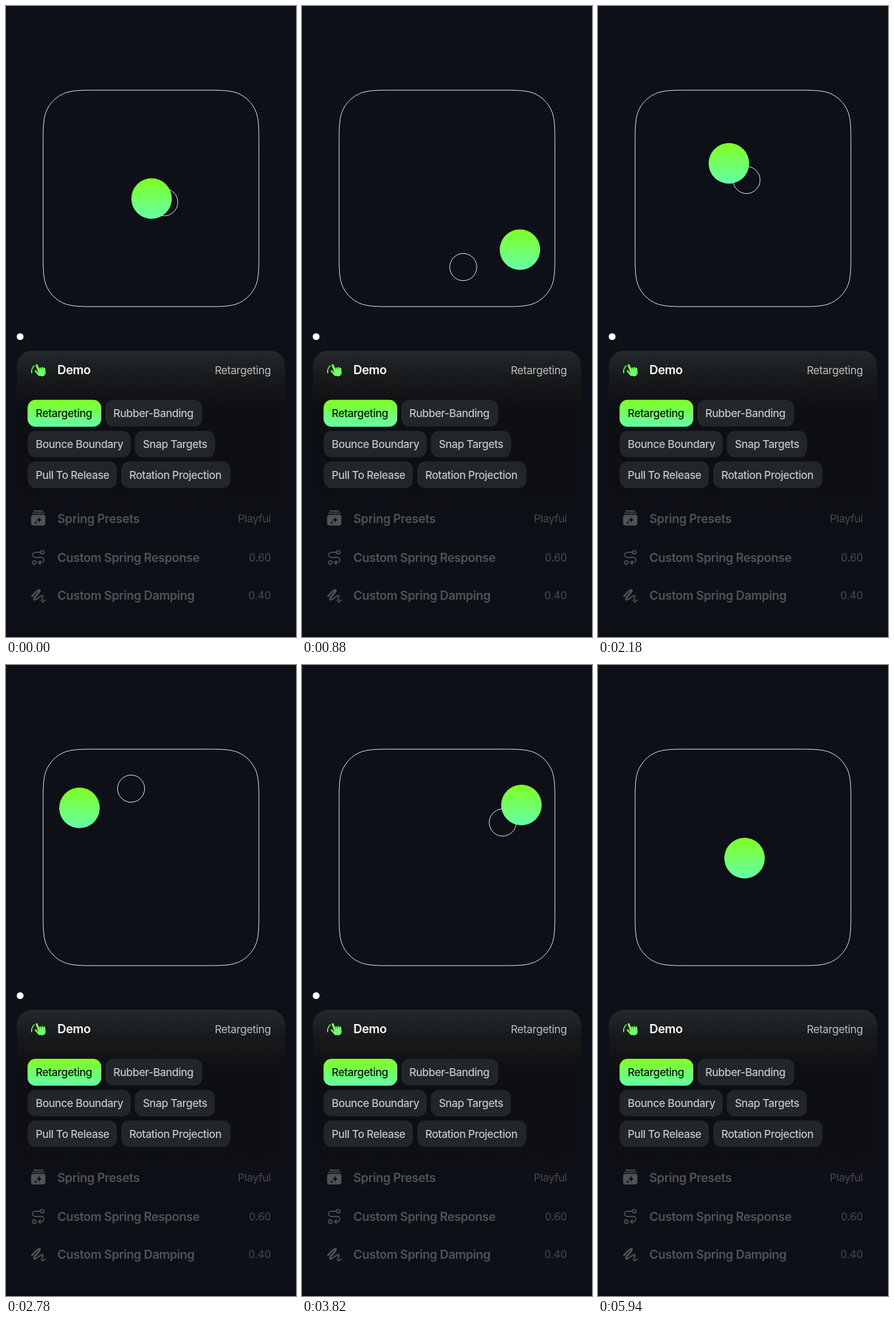
An HTML page that plays this animation: 508x1102 px, repeating every 6.01 s.

```html
<!DOCTYPE html>
<html lang="en">
<head>
<meta charset="utf-8">
<title>Retargeting demo</title>
<style>
  html, body { margin: 0; width: 100%; height: 100%; overflow: hidden; background: #0d1017; }
  svg { display: block; width: 100%; height: 100%; }
  text { font-family: Inter, "Liberation Sans", sans-serif; }
  .chip rect { fill: #222629; }
  .chip text { font-size: 18.8px; font-weight: 500; letter-spacing: -.024em; fill: #c3c5c8; }
  .chip.on rect { fill: url(#lime); }
  .chip.on text { fill: #0a160c; }
  .name { font-size: 21.2px; font-weight: 600; letter-spacing: -.02em; fill: #505356; }
  .value { font-size: 18.8px; letter-spacing: -.018em; text-anchor: end; fill: #47494d; }
  .head .name { fill: #fff; }
  .head .value { fill: #bcbec0; }
  .line { fill: none; stroke: #fff; }
  .icon { fill: none; stroke: #505356; stroke-linecap: round; stroke-linejoin: round; }
</style>
</head>
<body>
<svg viewBox="0 0 508 1102" preserveAspectRatio="none">
  <defs>
    <linearGradient id="lime" x2="0" y2="1">
      <stop stop-color="#80ff20"/>
      <stop offset="1" stop-color="#65ffaa"/>
    </linearGradient>
    <linearGradient id="panel" x2="0" y2="1">
      <stop stop-color="#24292b"/>
      <stop offset=".11" stop-color="#17191b"/>
      <stop offset=".23" stop-color="#0d0f12"/>
      <stop offset=".5" stop-color="#0d0f15"/>
      <stop offset="1" stop-color="#0d1017"/>
    </linearGradient>
    <path id="corner" d="M0-189H94.3C121.5-189 135.2-189 149.9-184.4C165.9-178.5 178.5-165.9 184.4-149.9C189-135.2 189-121.5 189-94.3V0"/>
  </defs>
  <rect width="508" height="1102" fill="#0d1017"/>
  <rect y="1098" width="508" height="4" fill="#0b0d11"/>

  <g class="line" transform="translate(254 336)">
    <use href="#corner"/>
    <use href="#corner" transform="rotate(90)"/>
    <use href="#corner" transform="rotate(180)"/>
    <use href="#corner" transform="rotate(270)"/>
  </g>

  <path d="M19 1050V628a26 26 0 0 1 26-26H463a26 26 0 0 1 26 26V1050Z" fill="url(#panel)"/>

  <g class="head">
    <g class="icon" style="stroke:#78ff55">
      <path d="M44.9 640.5C44.5 634.5 46.8 630.5 49.6 628.4" stroke-width="1.8"/>
      <path d="M53.8 627.4L59 641" stroke-width="3.8"/>
      <path d="M51.8 637.6L58.5 645M59.8 632.6L61.6 639M63.6 632L64.8 639M67.2 633L67.8 640" stroke-width="3"/>
      <ellipse cx="63" cy="640.8" rx="6.4" ry="6" fill="#70ff76" stroke="none"/>
    </g>
    <text class="name" x="90" y="643.4">Demo</text>
    <text class="value" x="464" y="642.7">Retargeting</text>
  </g>

  <g class="chip on"><rect x="37.7" y="687.8" width="129.2" height="47" rx="14"/><text x="52" y="718.3">Retargeting</text></g>
  <g class="chip"><rect x="174" y="688" width="170" height="46.5" rx="14"/><text x="188" y="718.3">Rubber-Banding</text></g>
  <g class="chip"><rect x="38" y="742" width="180.3" height="46.3" rx="14"/><text x="52" y="772">Bounce Boundary</text></g>
  <g class="chip"><rect x="225.7" y="742" width="140.4" height="46.3" rx="14"/><text x="239.7" y="772">Snap Targets</text></g>
  <g class="chip"><rect x="38" y="795.5" width="156.5" height="46.3" rx="14"/><text x="52" y="825.6">Pull To Release</text></g>
  <g class="chip"><rect x="202" y="795.5" width="191.2" height="46.3" rx="14"/><text x="216" y="825.6">Rotation Projection</text></g>

  <g class="icon" stroke-width="1.8">
    <path d="M49 882H64.5M46.8 885.6H66.6"/>
    <rect x="44" y="888.6" width="25" height="18.6" rx="4" fill="#505356" stroke="none"/>
    <path d="M58 891.8Q58.6 897 63.4 897.6Q58.6 898.2 58 903.4Q57.4 898.2 52.6 897.6Q57.4 897 58 891.8ZM52 899.6Q52.3 902 54.6 902.4Q52.3 902.8 52 905.2Q51.7 902.8 49.4 902.4Q51.7 902 52 899.6Z" fill="#0d0f14" stroke="none"/>
  </g>
  <text class="name" x="90" y="902.7">Spring Presets</text>
  <text class="value" x="464" y="901.8">Playful</text>

  <g class="icon" stroke-width="1.9">
    <circle cx="63.6" cy="954" r="3.1"/>
    <circle cx="49.6" cy="972" r="3.1"/>
    <path d="M60 954H51.3a4.5 4.5 0 0 0 0 9H62a4.5 4.5 0 0 1 0 9H57.5M60.2 969L57 972L60.2 975"/>
  </g>
  <text class="name" x="90" y="970.6">Custom Spring Response</text>
  <text class="value" x="464" y="969.7">0.60</text>

  <g class="icon">
    <path stroke-width="3.2" d="M45.6 1031C49 1027 56 1018.6 58.8 1019.8C62.4 1021.6 47 1033.6 49.6 1036.8"/>
    <path stroke-width="2.3" d="M49.6 1036.8C52.4 1039.4 60.5 1028.4 64 1029.6C67 1031 60.6 1037.6 62.8 1039.8C64.4 1041 66.8 1039.4 68.2 1037.6"/>
  </g>
  <text class="name" x="90" y="1036.6">Custom Spring Damping</text>
  <text class="value" x="464" y="1035.7">0.40</text>

  <circle id="dot" cx="24.8" cy="577.4" r="6" fill="#fff"/>
  <circle id="ring" class="line" r="23.7"/>
  <circle id="ball" r="35.5" fill="url(#lime)"/>
</svg>
<script>
  const LOOP = 6010, STEP = 20, DOT_OFF = 5940;
  const CENTER = { x: 254, y: 336 }, LEAD = 90, GAIN = 0.78;

  // Clockwise orbits, then swings through the centre (negative radius) that die out.
  // Each key: time in ms, angle in degrees, radius
  const keys = [
    [0, 15, 1], [90, 16, 31], [400, 165, 150], [880, 395, 156], [1500, 673.8, 165],
    [2180, 968, 66], [2270, 1001, 42], [2860, 1330, 160], [3100, 1403, 140],
    [3260, 1391.6, -149], [3440, 1393, -225], [3880, 1407, 165], [4180, 1417, -178],
    [4360, 1420, -45], [4560, 1466, 3]
  ];
  const last = keys.length - 1;

  // Tangent at a key: the two neighbouring slopes, the nearer one weighing more
  function slope(i, c) {
    if (i === 0 || i === last) return 0;
    const [a, b, d] = keys.slice(i - 1, i + 2);
    const h0 = b[0] - a[0], h1 = d[0] - b[0];
    return ((b[c] - a[c]) / h0 * h1 + (d[c] - b[c]) / h1 * h0) / (h0 + h1);
  }

  function orbit(time, gain) {
    const t = Math.min(time, keys[last][0]);
    const i = Math.max(1, keys.findIndex(k => k[0] >= t));
    const a = keys[i - 1], b = keys[i], h = b[0] - a[0], u = (t - a[0]) / h, v = 1 - u;
    const [deg, radius] = [1, 2].map(c =>
      v * v * ((1 + 2 * u) * a[c] + u * h * slope(i - 1, c)) +
      u * u * ((3 - 2 * u) * b[c] - v * h * slope(i, c)));
    const angle = deg * Math.PI / 180, r = radius * gain;
    return [CENTER.x + r * Math.cos(angle), CENTER.y + r * Math.sin(angle)];
  }

  const [ball, ring, dot] = ["ball", "ring", "dot"].map(id => document.getElementById(id));
  const place = (el, [x, y]) => el.setAttribute("transform", `translate(${x.toFixed(2)} ${y.toFixed(2)})`);

  // The ring runs ahead of the springy ball on a tighter orbit
  function draw() {
    const t = Math.floor(performance.now() % LOOP / STEP) * STEP;
    place(ball, orbit(t, 1));
    place(ring, orbit(t + LEAD, GAIN));
    dot.setAttribute("visibility", t < DOT_OFF ? "visible" : "hidden");
    requestAnimationFrame(draw);
  }
  draw();
</script>
</body>
</html>
```
